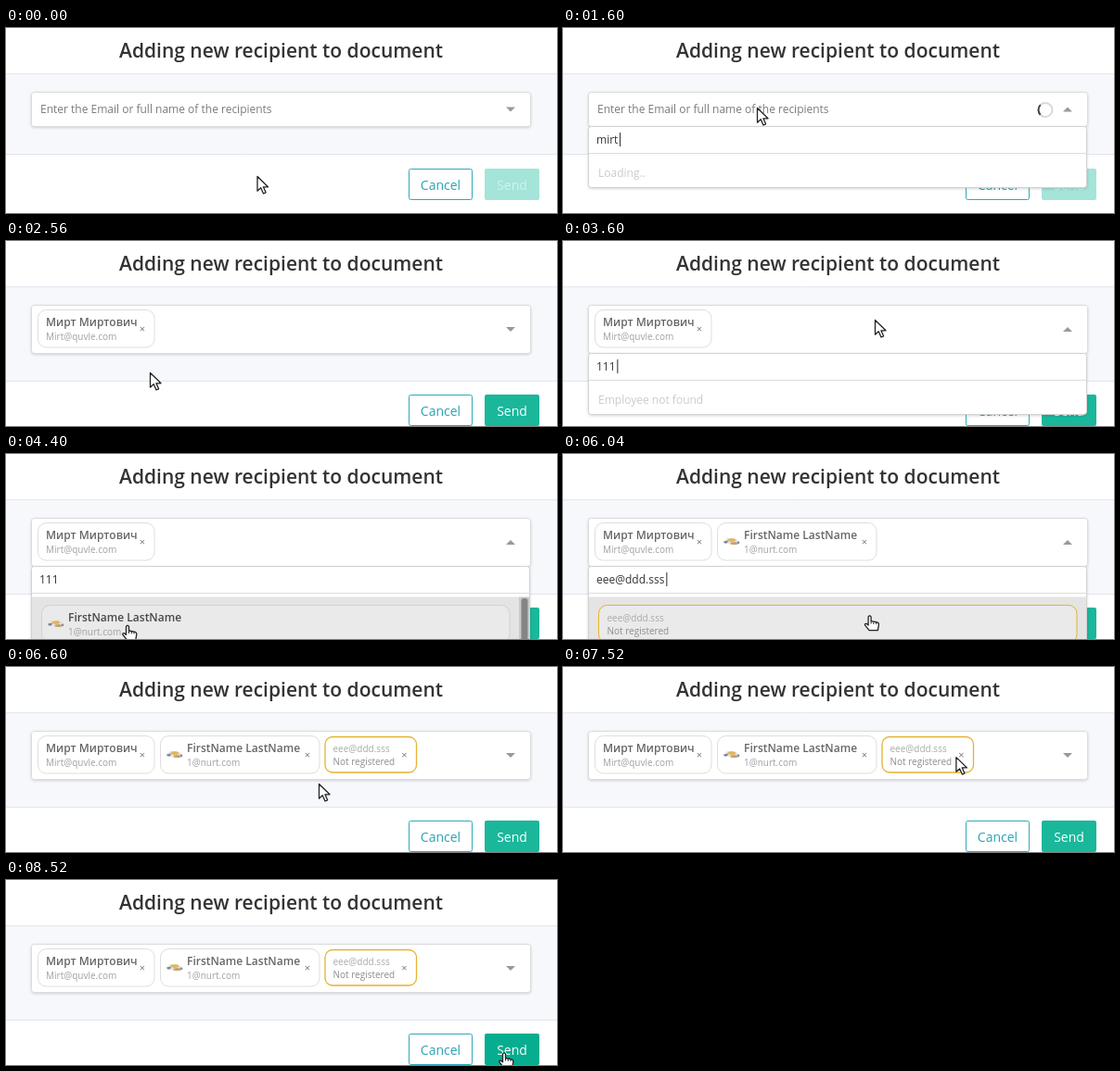
Write an HTML page that moves like this. It is 594 px wide and 200 px high and loops after 8560 ms.

```html
<!DOCTYPE html>
<html lang="en">
<head>
<meta charset="utf-8">
<title>Adding new recipient to document</title>
<style>
  html, body { margin: 0; width: 100%; height: 100%; overflow: hidden; background: #fff; }
  svg { display: block; width: 594px; height: 200px; font-family: "Open Sans", sans-serif; }
  text { white-space: pre; }
  .soft { filter: drop-shadow(0 1px 1.5px rgba(0, 0, 0, .16)); }
</style>
</head>
<body>
<svg id="stage" viewBox="0 0 594 200"></svg>
<script>
const LOOP = 8560;
const GOLD = '#e5b232';
const stage = document.getElementById('stage');

const person = { name: 'Мирт Миртович', mail: 'Mirt@quvle.com' };
const second = { name: 'FirstName LastName', mail: '1@nurt.com', photo: true };
const guest = { name: 'eee@ddd.sss', mail: 'Not registered', guest: true };

// Each session: the dropdown opens, text is typed, a result is picked.
const sessions = [
  { open: 720, load: 1600, found: 1920, pick: 2240, item: person, caret: 1360,
    keys: [[1000, 'm'], [1200, 'mi'], [1280, 'mir'], [1360, 'mirt']] },
  { open: 2880, load: 3840, found: 4080, pick: 4600, item: second, caret: 3600, scroll: true,
    keys: [[3360, '1'], [3480, '11'], [3600, '111']] },
  { open: 5160, load: 5360, found: 5840, pick: 6320, item: guest, caret: 4860, quiet: true,
    keys: [[5360, 'eee@ddd.sss']] }
];

// Pointer stops: time, x, y
const path = [
  [0, 270.5, 160], [80, 270.5, 160], [640, 209, 86], [1600, 209, 86], [2120, 152, 166],
  [2400, 152, 166], [2560, 155, 142], [2840, 336, 85], [3840, 336, 85], [4320, 131, 185],
  [4640, 131, 185], [5080, 368, 89.5], [5560, 368, 89.5], [6080, 330, 176], [6320, 330, 176],
  [6600, 337, 126], [7080, 392, 100], [7560, 424, 97], [8040, 400, 95], [8480, 537, 186.5],
  [LOOP, 537, 186.5]
];

const rect = (x, y, w, h, fill, stroke = 'none', r = 0, extra = '') =>
  `<rect x="${x}" y="${y}" width="${w}" height="${h}" rx="${r}" fill="${fill}" stroke="${stroke}" ${extra}/>`;
const text = (x, y, str, size, fill, extra = '') =>
  `<text x="${x}" y="${y}" font-size="${size}" fill="${fill}" ${extra}>${str}</text>`;
const line = (x1, x2, y, color) =>
  `<path d="M${x1} ${y}H${x2}" stroke="${color}"/>`;

function pointerAt(t) {
  let i = 1;
  while (i < path.length - 1 && path[i][0] < t) i++;
  const [t0, x0, y0] = path[i - 1], [t1, x1, y1] = path[i];
  const p = Math.min(1, (t - t0) / (t1 - t0));
  const e = p * p * (3 - 2 * p);
  return [x0 + (x1 - x0) * e, y0 + (y1 - y0) * e];
}

const photo = (x, y) => `<g transform="translate(${x} ${y})">
  <ellipse cx="9.5" cy="0" rx="7.5" ry="3.6" fill="#e6e2d8" transform="rotate(10 9.5 0)"/>
  <ellipse cx="9" cy="-1.4" rx="4.2" ry="1.9" fill="#e3b45e"/>
  <ellipse cx="11.5" cy="2" rx="4" ry="1.5" fill="#c5a274"/>
  <path d="M0 0L5 -1L4 2L1 2Z" fill="#76859b"/>
  <circle cx="16" cy="1.4" r="1.3" fill="#8b9099"/></g>`;

function label(item, x, y, dark) {
  if (item.guest)
    return text(x, y + 17.5, item.name, 10, '#aaa') + text(x, y + 31.5, item.mail, 10, '#8c8c8c');
  const tx = x + (item.photo ? 20 : 0);
  return (item.photo ? photo(x - 2, y + 20.5) : '') +
    text(tx, y + 17.5, item.name, 12, dark ? '#484848' : '#666', 'font-weight="600"') +
    text(tx, y + 32.5, item.mail, 10, '#a0a0a0');
}

function chip(item, x, w) {
  const frame = item.guest
    ? rect(x + .5, 75.5, w, 38.5, '#fff', GOLD, 8, 'stroke-width="1.3"')
    : rect(x + .5, 74.5, w, 40.5, '#fff', '#dedede', 9);
  return frame + label(item, x + 9, 74) +
    text(x + w - 12.5, 98.5, '×', 11, '#777', 'text-anchor="middle"');
}

function buttons(dy, ready, hover) {
  const fill = !ready ? '#a5e4d8' : hover ? '#06ad8f' : '#1ab79b';
  return rect(434.5, 152.5 + dy, 68, 33, '#fff', '#2fa9b8', 2) +
    text(468.5, 175 + dy, 'Cancel', 14, '#2aa3b5', 'text-anchor="middle"') +
    rect(516, 152 + dy, 59, 34, fill, 'none', 2) +
    text(545.5, 175 + dy, 'Send', 14, ready ? '#fff' : '#d0f3ec', 'text-anchor="middle"');
}

function spinner(y, age) {
  return `<g transform="translate(520 ${y}) rotate(${age / 800 * 360})" fill="none" stroke-width="2">
    <circle r="7.5" stroke="#d9d9d9"/>
    <path d="M-5.3 5.3A7.5 7.5 0 0 1 -5.3 -5.3" stroke="#444"/></g>`;
}

function dropdown(s, t, y) {
  const found = t >= s.found;
  const bottom = found ? (s.scroll ? 240 : y + 91) : y + 66;
  const typed = s.keys.filter(k => t >= k[0]).pop();
  const str = typed ? typed[1] : '';
  const caret = Math.floor((t - s.caret + 4000) / 500) % 2 === 0;
  let out = rect(27.5, y + .5, 537, bottom - y, '#fff', '#d2d2d2', 3, 'class="soft"') +
    line(28, 565, y + 29.5, '#dcdcdc') +
    `<text x="36" y="${y + 18.5}" font-size="12" fill="#333">${str}` +
    (caret ? '<tspan dx="-1.5" dy="-.5" font-size="14" fill="#222">|</tspan>' : '') + '</text>';
  if (found) {
    const right = s.scroll ? 553 : 564;
    out += rect(28, y + 33.5, right - 28, s.scroll ? 90 : 56, '#e4e4e4') +
      rect(38.5, y + 42.5, right - 48.5, 40.5, '#eaeaea', s.item.guest ? GOLD : '#d2d2d2', 9) +
      label(s.item, s.item.photo ? 47 : 47.5, y + 42, true);
    if (s.scroll) out += rect(553, y + 33.5, 11, 90, '#c9c9c9') + rect(555.5, y + 35, 7, 90, '#858585', 'none', 3);
  } else {
    const loading = t >= s.load && !s.quiet;
    out += text(38, y + 54.5, loading ? 'Loading..' : 'Employee not found', 12, '#cbcbcb');
  }
  return out;
}

const arrow = '<path d="M.5 .5V16.2L4.2 12.8L7 19L9.6 17.8L6.9 11.8H12Z" fill="#fff" stroke="#222" stroke-width="1.3" stroke-linejoin="round"/>';
const hand = `<path d="M-1.5 1.5Q0 -.8 1.5 1.5V6L8 7.3Q10 7.8 9.8 10L8.8 16H-.5L-5 10.5Q-5.6 8.3 -3.4 8.8L-1.5 10.4Z"
  fill="#fff" stroke="#222" stroke-width="1.3" stroke-linejoin="round"/>
  <path d="M1.5 6V9M4.3 6.8V9.4M7 7.3V9.6" stroke="#222" fill="none"/>`;

function render(t) {
  const picked = sessions.filter(s => t >= s.pick).length;
  const s = sessions.find(s => t >= s.open && t < s.pick);
  const dy = picked ? 15 : 0;
  const base = 106 + dy;
  const mid = picked ? 95.5 : 88;
  const [px, py] = pointerAt(t);
  const onSend = picked > 0 && px > 516 && px < 575 && py > 167;
  const onItem = s && t >= s.found && py > base + 33;

  let out = rect(0, 0, 594, 200, '#fff') +
    text(296.5, 31.5, 'Adding new recipient to document', 21, '#333', 'font-weight="600" text-anchor="middle"') +
    rect(0, 49, 594, 88 + dy, '#f6f8fc') +
    line(0, 594, 49.5, '#e3e7f0') + line(0, 594, 136.5 + dy, '#e1e5ed') +
    buttons(picked ? 14 : 0, picked > 0, onSend) +
    rect(27.5, 69.5, 538, 37 + dy, '#fff', '#dcdcdc', 3, 'class="soft"');

  if (!picked) out += text(37, 91.8, 'Enter the Email or full name of the recipients', 12, '#7c7c7c');
  if (picked > 0) out += chip(person, 34, 125.5);
  if (picked > 1) out += chip(second, 166, 171.5);
  if (picked > 2) out += chip(guest, 343.5, 98.5);
  if (s) {
    out += dropdown(s, t, base);
    if (!s.quiet && t >= s.load && t < s.found) out += spinner(mid + .5, t - s.load);
  }
  out += `<path d="M539 ${mid + (s ? 2.5 : -2.5)}h10l-5 ${s ? -5 : 5}z" fill="#999"/>`;
  out += `<g transform="translate(${px.toFixed(1)} ${py.toFixed(1)})">${onSend || onItem ? hand : arrow}</g>`;
  stage.innerHTML = out;
}

const start = performance.now();
function tick() {
  render((performance.now() - start) % LOOP);
  requestAnimationFrame(tick);
}
render(0);
requestAnimationFrame(tick);
</script>
</body>
</html>
```
